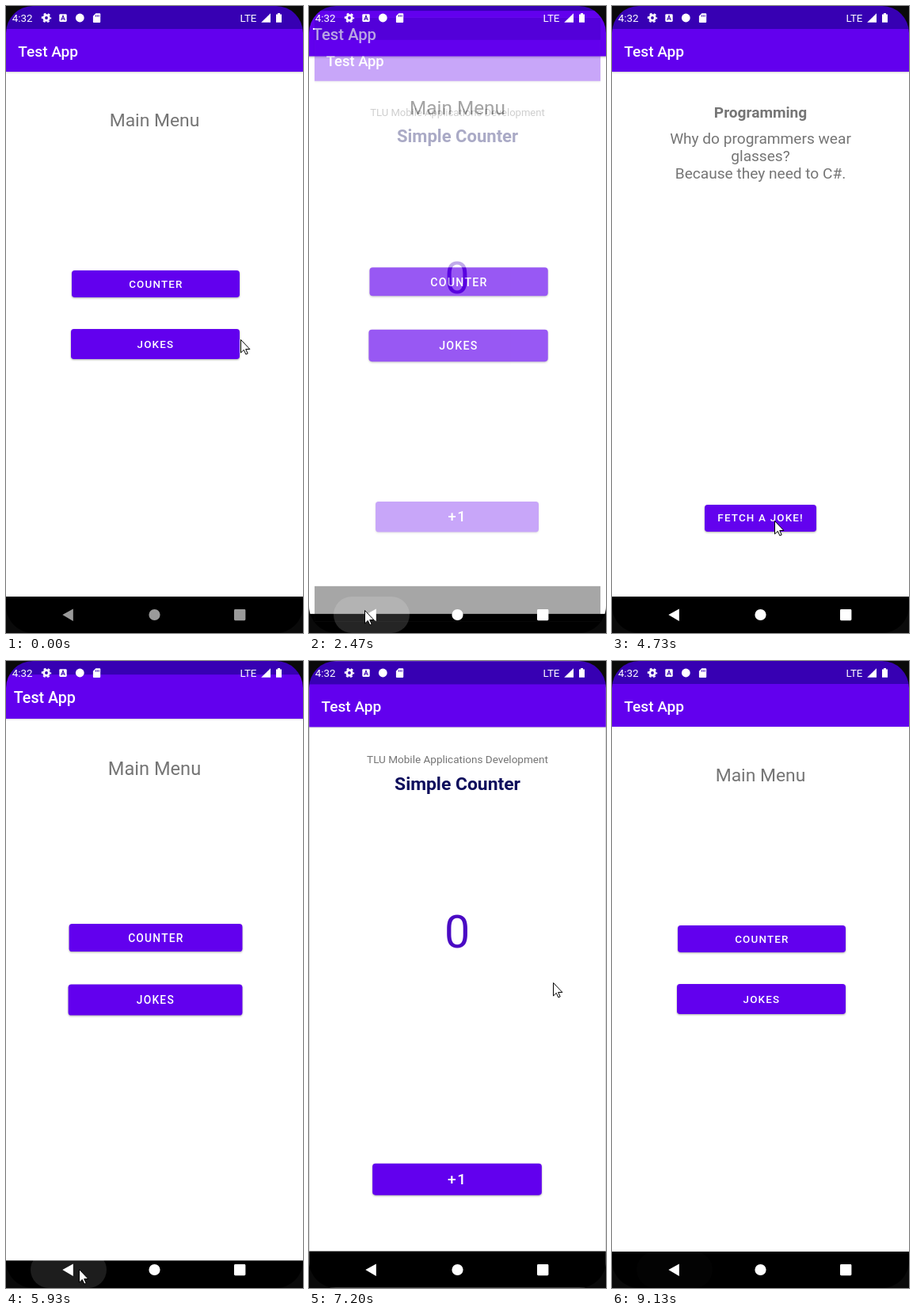
Recreate the animation shown at these times as an HTML page. Size 375x792 px, loop 9.39 s.

```html
<!DOCTYPE html>
<html lang="en">
<head>
<meta charset="utf-8">
<title>Test App</title>
<style>
html, body { margin: 0; width: 100%; height: 100%; overflow: hidden; background: #000; }
#stage { position: absolute; left: 0; top: 0; width: 375px; height: 792px; overflow: hidden; background: #000; font: 13.37px Roboto, sans-serif; }
#stage * { position: absolute; box-sizing: border-box; }
.page { inset: 0; background: #fff; transform-origin: 187.5px 395.85px; }
.bar { left: 0; top: 0; width: 375px; height: 82.6px; background: #6200ee; box-shadow: 0 1px 2px #0003; }
.status { left: 0; top: 0; width: 375px; height: 29.2px; background: #3700b3; }
.foot { left: 0; top: 745.8px; width: 375px; height: 46.2px; background: #000; }
.t { left: 0; width: 375px; top: calc(var(--y) * 1px - 40px); line-height: 80px; text-align: center; white-space: nowrap; color: #757575; }
.title { left: 15.28px; text-align: left; color: #fff; font-size: 19.1px; font-weight: 500; }
.h { font-size: 22.9px; }
.b { font-weight: 700; }
.joke { left: 0; width: 375px; top: 156.6px; text-align: center; font-size: 19.1px; line-height: 22.2px; color: #757575; white-space: pre-line; }
.btn { display: flex; align-items: center; justify-content: center; overflow: hidden; border-radius: 3.8px; background: #6200ee; color: #fff; font-weight: 500; letter-spacing: .0893em; padding-left: 1.2px; }
.lift { filter: drop-shadow(0 1px 1px #0005); inset: 0; }
.btn i { left: 50%; top: 50%; width: 240px; height: 240px; margin: -120px; border-radius: 50%; background: #fff; opacity: 0; }
#ring { left: 31px; top: 746px; width: 96px; height: 46px; border-radius: 23px; background: #fff; opacity: 0; }
#over { left: 0; top: 0; width: 375px; height: 792px; }
#corners { inset: 0; border-radius: 34px; box-shadow: 0 0 0 34px #0a0a0a; }
#cursor { left: 0; top: 0; width: 14px; height: 21px; overflow: visible; }
</style>
</head>
<body>
<div id="stage">
  <div class="page" id="menu">
    <div class="bar"></div><div class="status"></div><div class="foot"></div>
    <div class="t title" style="--y:57.8">Test App</div>
    <div class="t h" style="--y:145">Main Menu</div>
    <div class="lift">
      <div class="btn" style="left:82.5px;top:334px;width:212.5px;height:34.4px">COUNTER<i id="toCounter"></i></div>
      <div class="btn" style="left:82px;top:408px;width:212.5px;height:38px">JOKES<i id="toJokes"></i></div>
    </div>
  </div>
  <div class="page" id="counter">
    <div class="bar"></div><div class="status"></div><div class="foot"></div>
    <div class="t title" style="--y:57.8">Test App</div>
    <div class="t" style="--y:123.5;font-size:13.55px">TLU Mobile Applications Development</div>
    <div class="t h b" style="--y:156;color:#0d0d5c">Simple Counter</div>
    <div class="t" id="count" style="--y:342.5;left:-.4px;color:#4a0ac4;font-size:57.3px">0</div>
    <div class="lift">
      <div class="btn" style="left:79.8px;top:634.5px;width:214.2px;height:40.7px;font-size:19.1px">+1<i id="plus"></i></div>
    </div>
  </div>
  <div class="page" id="jokes">
    <div class="bar"></div><div class="status"></div><div class="foot"></div>
    <div class="t title" style="--y:57.8">Test App</div>
    <div class="t b" style="--y:134.8;font-size:19.1px">Programming</div>
    <div class="joke" id="joke"></div>
    <div class="lift">
      <div class="btn" style="left:116.5px;top:629.5px;width:141px;height:34.4px">FETCH A JOKE!<i id="fetch"></i></div>
    </div>
  </div>
  <div id="ring"></div>
  <svg id="over" viewBox="0 0 375 792" fill="#fff">
    <g font-family="Roboto, sans-serif" font-size="13.37">
      <text x="7.7" y="19.8">4:32</text>
      <text x="295.5" y="19.8">LTE</text>
    </g>
    <circle cx="51" cy="15" r="3.3" fill="none" stroke="#fff" stroke-width="2.8"/>
    <circle cx="51" cy="15" r="5.3" fill="none" stroke="#fff" stroke-width="1.8" stroke-dasharray="2.8 2.75" stroke-dashoffset="1.4"/>
    <rect x="67.3" y="10.3" width="9.4" height="9.6" rx="1.3"/>
    <path d="M69.7 18 72 12.2 74.3 18M70.6 16.2h2.8" fill="none" stroke="#3700b3" stroke-width="1.1"/>
    <circle cx="93.3" cy="15" r="5.4"/>
    <path d="M113.4 9.3h4.8a1 1 0 0 1 1 1v9.7a1 1 0 0 1-1 1h-7.3a1 1 0 0 1-1-1v-7.2z"/>
    <path d="M113.4 11.4v2.2M115.3 11.4v2.2M117.2 11.4v2.2" stroke="#3700b3"/>
    <path d="M334 9.3v11.4h-11.8z"/>
    <path d="M341 10.4h2v-1.3h3v1.3h2v10.3h-7z"/>
    <g id="nav">
      <path d="M71.3 769 84.8 761.5V777z"/>
      <circle cx="187.5" cy="769" r="7.1"/>
      <rect x="288" y="762" width="14.4" height="14.2" rx="1.4"/>
    </g>
  </svg>
  <div id="corners"></div>
  <svg id="cursor" viewBox="0 0 14 21">
    <path d="M.5.5V17l3.8-3.6 2.6 5.6 2.3-1-2.5-5.5h5.2z" fill="#fff" stroke="#000"/>
  </svg>
</div>
<script>
const LOOP = 9390, TICK = 1000 / 15;
const $ = id => document.getElementById(id);
const clamp = v => Math.min(1, Math.max(0, v));

const visits = [
  { page: 'counter', open: 900, close: 2401 },
  { page: 'jokes', open: 3243, close: 5849 },
  { page: 'counter', open: 6900, close: 8735 }
];
const taps = { toCounter: [800, 6870], toJokes: [3190], fetch: [4290], plus: [7870, 8200] };
const backTaps = [2330, 5720, 8660];
const path = [
  [70, 296, 421], [400, 205, 357], [800, 205, 357], [1130, 215, 351], [1200, 215, 351],
  [1730, 212, 670], [2130, 72, 762], [2400, 70, 763], [2600, 70, 763], [3200, 204, 425],
  [3470, 204, 425], [4200, 204, 650], [5330, 206, 650], [5700, 92, 768], [5940, 92, 768],
  [6200, 215, 535], [6670, 290, 364], [7000, 290, 364], [7200, 308, 406], [7730, 230, 650],
  [8270, 230, 650], [8600, 75, 765], [8870, 75, 765], [9000, 60, 810]
];
const jokes = [
  '"Honey, go to the store and buy\nsome eggs."\n"OK."\n"Oh and while you\'re there, get\nsome milk."\nHe never returned.',
  'Why do programmers wear\nglasses?\nBecause they need to C#.'
];

const bezier = (a, b, c, d, u) => {
  const v = 1 - u;
  return a * v * v * v + 3 * b * v * v * u + 3 * c * v * u * u + d * u * u * u;
};

// Fast out, extra slow in: two joined curves over 400 ms
function ease(ms) {
  const x = clamp(ms / 400), first = x < 1 / 6;
  const xs = first ? [0, .05, .1333, 1 / 6] : [1 / 6, .2083, .25, 1];
  const ys = first ? [0, 0, .06, .4] : [.4, .82, 1, 1];
  let lo = 0, hi = 1;
  for (let i = 0; i < 24; i++) {
    const mid = (lo + hi) / 2;
    if (bezier(...xs, mid) < x) lo = mid; else hi = mid;
  }
  return bezier(...ys, lo);
}

function pose(el, scale, alpha) {
  el.style.transform = scale === 1 ? 'none' : `scale(${scale})`;
  el.style.opacity = alpha;
  el.style.visibility = alpha > 0 ? 'visible' : 'hidden';
}

function drawPages(t) {
  const state = { menu: [1, 1], counter: [1, 0], jokes: [1, 0] };
  for (const v of visits) {
    if (t < v.open || t >= v.close + 400) continue;
    const closing = t >= v.close;
    const ms = t - (closing ? v.close : v.open);
    const p = ease(ms), fade = clamp((ms - 33) / 50);
    state.menu = closing ? [1.1 - .1 * p, 1] : [1 + .05 * p, 1 - .6 * clamp(ms / 85)];
    state[v.page] = closing ? [1 - .1 * p, 1 - fade] : [.85 + .15 * p, fade];
  }
  for (const id in state) pose($(id), ...state[id]);
}

function drawTaps(t) {
  for (const id in taps) {
    const ms = t - (taps[id].filter(s => s <= t).pop() ?? -LOOP);
    $(id).style.opacity = .24 * clamp(ms / 60) * clamp((450 - ms) / 250);
    $(id).style.transform = `scale(${.15 + .85 * clamp(ms / 225)})`;
  }
  const ms = t - (backTaps.filter(s => s <= t).pop() ?? -LOOP);
  $('ring').style.opacity = .15 * clamp(ms / 80) * clamp((500 - ms) / 380);
}

function drawCursor(t) {
  let [, x, y] = path[0];
  for (let i = 1; i < path.length; i++) {
    const [t0, x0, y0] = path[i - 1], [t1, x1, y1] = path[i];
    if (t < t0) break;
    const k = clamp((t - t0) / (t1 - t0)), s = k * k * (3 - 2 * k);
    x = x0 + (x1 - x0) * s;
    y = y0 + (y1 - y0) * s;
  }
  $('cursor').style.transform = `translate(${Math.round(x)}px, ${Math.round(y)}px)`;
}

function setText(el, text) {
  if (el.textContent !== text) el.textContent = text;
}

function frame() {
  const now = performance.now() % LOOP;
  const t = Math.floor((now + 4) / TICK) * TICK;
  drawPages(t);
  drawTaps(t);
  drawCursor(t);
  setText($('count'), String(taps.plus.filter(s => s + 60 <= t).length));
  setText($('joke'), jokes[t < 4660 ? 0 : 1]);
  $('nav').setAttribute('fill', t < 2330 ? '#9a9a9a' : '#fff');
  requestAnimationFrame(frame);
}
frame();
</script>
</body>
</html>
```
